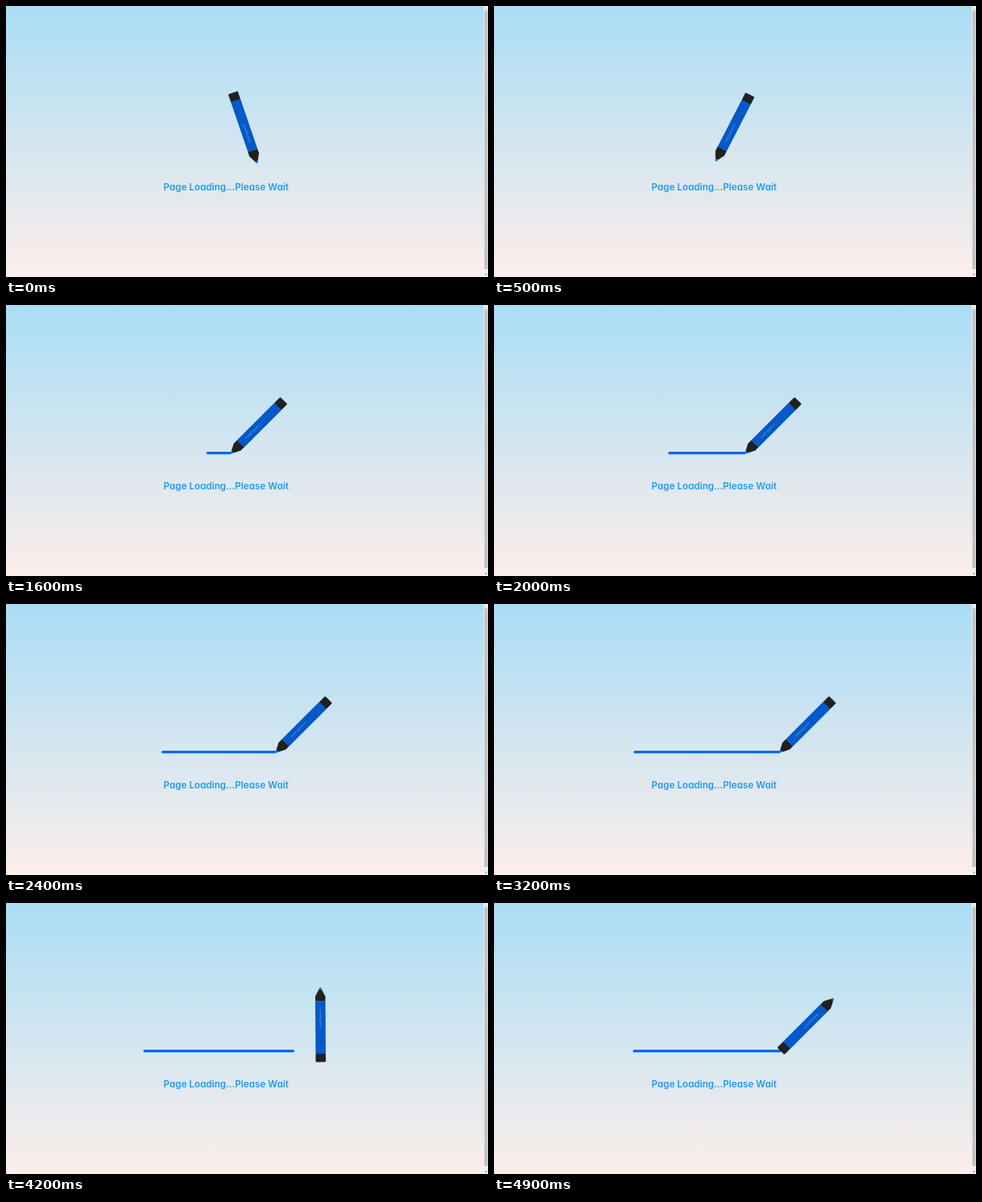
Recreate the animation shown at these times as an HTML page. Size 600 by 338 pixels, loop 5000 ms.

```html
<!DOCTYPE html>
<html lang="en">
<head>
<meta charset="utf-8">
<title>Page loading</title>
<style>
  html, body { margin: 0; width: 100%; height: 100%; overflow: hidden; }
  svg { display: block; width: 100vw; height: 100vh; }
  .message {
    font: 600 11.7px Inter, "Open Sans", sans-serif;
    font-feature-settings: "cv11";
    fill: #1e9cf2;
    text-anchor: middle;
  }
  .label {
    font: 4px "Open Sans", sans-serif;
    fill: #6c9fe0;
    text-anchor: middle;
  }
</style>
</head>
<body>
<svg viewBox="0 0 600 338">
  <defs>
    <linearGradient id="sky" x1="0" y1="0" x2="0" y2="1">
      <stop offset="0" stop-color="#a9ddf6"/>
      <stop offset="1" stop-color="#fceeea"/>
    </linearGradient>
  </defs>
  <rect width="600" height="338" fill="url(#sky)"/>

  <g id="scrollbar">
    <rect x="594.6" width="5.4" height="338" fill="#f1f1f1"/>
    <rect x="595.5" y="5.4" width="4" height="322.6" fill="#c1c1c1"/>
    <path d="M596.3 3.6h2.4l-1.2-1.4z" fill="#a3a3a3"/>
    <path d="M596.3 334.4h2.4l-1.2 1.5z" fill="#505050"/>
  </g>

  <rect id="line" y="183.1" height="3.2" rx="1.5" fill="#0468f0"/>

  <!-- Upright pencil, tip at the top, turning about its middle -->
  <g id="pencil">
    <path d="M-1.9 -43.5L-1.3 -46.2Q0 -47 1.3 -46.2L1.9 -43.5z" fill="#0b70e4"/>
    <path d="M-6.3 -29.5V-35.5L-2 -43.8H2L6.3 -35.5V-29.5z" fill="#212121"/>
    <rect x="-6.3" y="-29.6" width="12.6" height="66" fill="#0559c8"/>
    <rect x="-6.3" y="36" width="12.6" height="10.4" rx="1.3" fill="#212121"/>
    <text class="label" transform="translate(-1 -7) rotate(90)">loadingpencil</text>
  </g>

  <text class="message" x="274" y="230.4">Page Loading...Please Wait</text>
</svg>
<script>
  const LOOP = 5000, STEP = 100;
  const CYCLE = 10000, LEAD = 750;
  const CENTER = { x: 297.5, y: 152 };
  const LINE_X = 265, REACH = 94;

  const pencil = document.getElementById("pencil");
  const line = document.getElementById("line");

  // [part of the cycle, travel, angle]
  const keys = [
    [0, 0, 45],
    [0.2, 0, 225],
    [0.45, REACH, 225],
    [0.55, REACH, 405],
    [1, 0, 405]
  ];

  const bezier = (a, b, s) =>
    3 * a * s * (1 - s) ** 2 + 3 * b * s * s * (1 - s) + s ** 3;

  // cubic-bezier(.25, .1, .25, 1)
  function ease(x) {
    let lo = 0, hi = 1;
    for (let i = 0; i < 24; i++) {
      const mid = (lo + hi) / 2;
      if (bezier(0.25, 0.25, mid) < x) lo = mid; else hi = mid;
    }
    return bezier(0.1, 1, lo);
  }

  function pose(p) {
    const i = keys.findIndex(k => p < k[0]);
    const a = keys[i - 1], b = keys[i];
    const e = ease((p - a[0]) / (b[0] - a[0]));
    return { travel: a[1] + (b[1] - a[1]) * e, angle: a[2] + (b[2] - a[2]) * e };
  }

  function draw(ms) {
    const t = Math.floor((ms % LOOP) / STEP) * STEP;
    const { travel, angle } = pose((t + LEAD) / CYCLE);
    pencil.setAttribute("transform",
      `translate(${CENTER.x + travel} ${CENTER.y}) rotate(${angle})`);
    line.setAttribute("x", LINE_X - travel);
    line.setAttribute("width", 2 * travel);
  }

  const start = performance.now();
  function tick() {
    draw(performance.now() - start);
    requestAnimationFrame(tick);
  }
  tick();
</script>
</body>
</html>
```
